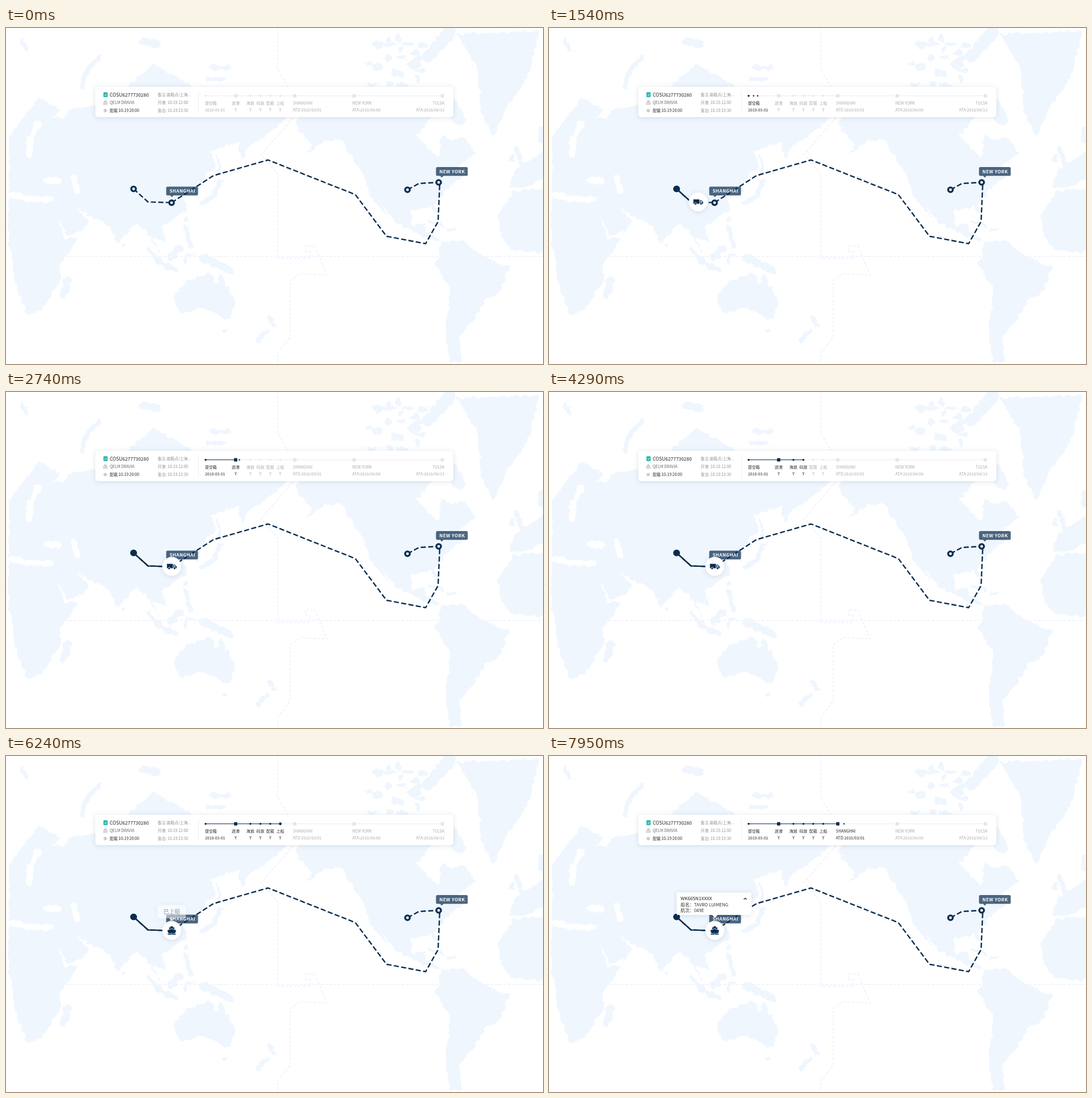
These frames come from a looping animation (947x592 px, 8 s). An HTML page:

```html
<!DOCTYPE html>
<html>
<head>
<meta charset="utf-8">
<title>Shipment tracking</title>
<style>
  html, body { margin: 0; width: 100%; height: 100%; overflow: hidden; background: #fff; }
  svg { display: block; width: 100vw; height: 100vh; }
  text { font-family: "Noto Sans CJK SC", "Noto Sans CJK", "Noto Sans", sans-serif; font-size: 6.9px; fill: #8f8f8f; }
  #map { fill: #eff6fe; filter: url(#coast); }
  #map path { fill: none; stroke: #eff6fe; stroke-linecap: round; stroke-linejoin: round; }
  #map .sea { stroke: #fff; }
  .grid { fill: none; stroke: #ededfb; stroke-width: 1.4; stroke-dasharray: 4.5 3; }
  .card { fill: #fff; filter: drop-shadow(0 1px 4px rgba(30, 50, 80, .14)); }
  .strong { font-weight: 500; fill: #222; }
  .route { fill: none; stroke: #0a2d50; stroke-width: 2.4; stroke-linejoin: round; }
  .planned { stroke-dasharray: 9 4.1; }
  .navy { fill: #0a2d50; }
  .tag { fill: #0a2d50; opacity: .72; }
  .tag-text { font-size: 8px; font-weight: 700; fill: #fff; letter-spacing: .45px; }
  .stop text { fill: #aaa; }
  .stop.lit text { fill: #222; }
  .mark { fill: #e6e6e6; transform-box: fill-box; transform-origin: center; }
  .lit .mark { fill: #0a2d50; }
  .big .mark { transform: scale(1.35); }
  #note text { font-size: 9.8px; font-weight: 500; fill: #1c3049; text-anchor: middle; }
  #details text { font-size: 7.9px; fill: #333; }
  #details .strong { font-size: 8.2px; fill: #222; }
</style>
</head>
<body>
<svg viewBox="0 0 947 592" preserveAspectRatio="none">
  <defs>
    <filter id="coast" filterUnits="userSpaceOnUse" x="0" y="0" width="947" height="592" color-interpolation-filters="sRGB">
      <feTurbulence type="fractalNoise" baseFrequency=".1" numOctaves="3" seed="4"/>
      <feDisplacementMap in="SourceGraphic" scale="10" xChannelSelector="R" yChannelSelector="G"/>
    </filter>
  </defs>

  <g class="grid">
    <path d="M90 402.5H947"/>
    <path d="M479 0V72L497 103L507 157L450 223L479 257V406H536V393H528V384H545L566 435L518 433L501 446V545L479 573V592"/>
  </g>

  <!-- Rough outlines; the coast filter adds the small detail -->
  <g id="map">
    <polygon points="5,205 8,188 25,165 58,122 98,145 84,158 104,160 110,144 168,134 178,108 190,140 216,100 262,62 294,84 334,106 424,128 479,138 497,158 452,194 430,205 415,236 410,200 361,218 370,240 344,272 339,302 331,290 316,282 313,298 320,320 276,350 283,378 259,368 270,398 250,362 230,344 204,372 198,381 180,346 146,331 125,317 146,341 136,356 110,368 82,320 5,300"/>
    <polygon points="5,285 80,310 104,371 127,370 94,420 97,445 65,494 38,508 18,455 10,392 5,390"/>
    <polygon points="294,474 320,446 360,430 370,451 380,432 404,485 392,516 350,492 306,503"/>
    <polygon points="511,166 530,142 547,122 610,130 715,140 738,135 757,150 724,190 750,218 763,228 768,188 793,198 806,190 830,222 798,242 810,256 773,290 757,312 761,330 748,315 714,322 718,350 740,342 738,358 752,362 768,378 735,367 690,345 662,310 676,336 640,292 632,260 605,220 590,196 560,200 525,225 540,206 515,180"/>
    <polygon points="768,378 803,372 842,403 888,422 868,469 848,476 822,518 800,545 805,590 782,588 775,525 785,460 757,418"/>
    <polygon points="796,10 940,6 920,88 878,148 860,190 838,150 832,72"/>
    <polygon points="955,284 897,287 866,330 876,373 890,390 955,397"/>
    <polygon points="888,283 890,266 900,247 935,225 955,212 955,262 914,282"/>
    <path stroke-width="5" d="M374 226L377 258M316 415L318 400L328 399M746 343L770 349M778 354H789M317 334V340M207 382V385"/>
    <path stroke-width="8" d="M345 309L366 296L378 270M317 352L326 384M252 390L272 414L300 426M465 511L472 523M460 534L444 550M134 106Q134 76 164 53M28 22L36 38M362 70H392M356 90H382M909 238L900 212M385 533H386M892 226V232"/>
    <path stroke-width="13" d="M290 404L305 388M348 405L370 414L394 428M109 443L101 470M242 24L266 28M945 200V178"/>
    <path stroke-width="22" d="M752 116L780 130L798 160M656 122H690M745 50L782 8"/>
    <path class="sea" stroke-width="11" d="M70 268H92M120 264L126 288M10 294L45 302H78M40 222L44 194L56 168"/>
  </g>

  <path class="route planned" d="M225 283.5L250.5 306.5L292 307.7"/>
  <path class="route planned" d="M292 307.7L366 260L462 232.5L616 293.5L671 367L740 380L762 341L765 272"/>
  <path class="route planned" d="M708 285L728 274L763 272"/>
  <path class="route" id="trail" d="M225 283.5L250.5 306.5L292 307.7"/>
  <g fill="#fff" stroke="#0a2d50" stroke-width="3.4">
    <circle cx="225" cy="283.5" r="4.1"/>
    <circle cx="292" cy="307.8" r="4.1"/>
    <circle cx="763" cy="272" r="4.1"/>
    <circle cx="708" cy="285" r="4.1"/>
  </g>
  <circle class="navy" id="origin" cx="225" cy="283.5" r="5.8"/>

  <g id="tags"></g>

  <g id="vehicle">
    <circle class="card" r="16.7"/>
    <g class="navy" id="truck">
      <path d="M-8.5-4.5H2V3.2H-8.5ZM2.8-3H6L8.6.2V3.2H2.8Z"/>
      <path fill="#fff" d="M4-2H5.6L7.2.2H4Z"/>
      <g stroke="#fff" stroke-width=".8"><circle cx="-4.6" cy="3.4" r="2"/><circle cx="5" cy="3.4" r="2"/></g>
    </g>
    <g class="navy" id="ship">
      <path d="M-2-7.2H2V-5.2H4.6V-2L7.8-.8L6.4 4.2Q3.2 6.6 0 4.8Q-3.2 6.6-6.4 4.2L-7.8-.8L-4.6-2V-5.2H-2Z"/>
      <path stroke="#fff" stroke-width=".8" fill="none" d="M-8-.4L0-3.2L8-.4"/>
      <path stroke="#0a2d50" stroke-width="1.4" fill="none" d="M-7.2 6Q-3.6 7.8 0 6Q3.6 7.8 7.2 6"/>
    </g>
  </g>

  <g id="note">
    <path class="card" d="M-22.5-44.5H22a3 3 0 0 1 3 3V-24.5a3 3 0 0 1-3 3H4.5L0-16L-4.5-21.5H-22.5a3 3 0 0 1-3-3V-41.5a3 3 0 0 1 3-3Z"/>
    <text y="-29.4"></text>
  </g>

  <g id="details">
    <path class="card" d="M227 240.5H355a2 2 0 0 1 2 2V278a2 2 0 0 1-2 2H297L292.5 285.5L288 280H227a2 2 0 0 1-2-2V242.5a2 2 0 0 1 2-2Z"/>
    <text class="strong" x="232" y="254">WK665N1XXXX</text>
    <text x="232" y="265.2">船名：TAVRO LUIMENG</text>
    <text x="232" y="275.2">航次：049E</text>
    <path d="M343.5 252.8L346 250.3L348.5 252.8" fill="none" stroke="#222" stroke-width="1.3"/>
  </g>

  <rect class="card" x="157.5" y="103.5" width="631.5" height="53.5" rx="5"/>
  <path d="M339.5 111V151" stroke="#f0f0f0"/>
  <rect x="171.8" y="113.2" width="7.4" height="8.6" rx="1.3" fill="#27b5ae"/>
  <path d="M173.6 117.6L175.2 119.1L177.6 116.3" fill="none" stroke="#fff"/>
  <path fill="#ccc" d="M173.3 127.6H177.2V129.6L179.2 131V135H171.2V131L173.3 129.6Z"/>
  <path stroke="#fff" stroke-width=".7" d="M171 132.4H179.4"/>
  <circle cx="175" cy="145.5" r="2.9" fill="#ccc"/>
  <text class="strong" x="183" y="120.9" style="font-size:8.4px">COSU6277730280</text>
  <text x="183" y="134.2" style="fill:#666">QELM DRAVIA</text>
  <text class="strong" x="183" y="148">配载 10-19 20:00</text>
  <text x="267.5" y="120.4">备注:装箱点/上海...</text>
  <text x="267.5" y="134">开港: 10-15 12:00</text>
  <text x="267.5" y="148">靠泊: 10-19 23:30</text>

  <path d="M352 119.5H770" stroke="#ececec"/>
  <path id="progress" stroke="#0a2d50"/>
  <g id="stops"></g>
  <g class="navy" id="dots"></g>
</svg>

<script>
const $ = id => document.getElementById(id);
const add = (parent, tag, attrs, text = '') => {
  const el = document.createElementNS('http://www.w3.org/2000/svg', tag);
  for (const key in attrs) el.setAttribute(key, attrs[key]);
  el.textContent = text;
  return parent.appendChild(el);
};
const show = (el, on) => { el.style.opacity = +on; };

// Arctic archipelago: seeded scatter of small islands
let seed = 11;
const random = () => (seed = seed * 16807 % 2147483647) / 2147483647;
for (let i = 0; i < 26; i++) {
  add($('map'), 'ellipse', {
    cx: 642 + 92 * random(), cy: 105 - 95 * random(),
    rx: 4 + 8 * random(), ry: 3 + 5 * random()
  });
}

function addTag(label, x, y, tipX) {
  add($('tags'), 'path', {
    class: 'tag',
    d: `M${x + 2.5} ${y}h51a2.5 2.5 0 0 1 2.5 2.5v10.5a2.5 2.5 0 0 1-2.5 2.5H${tipX + 3}l-3 3l-3-3H${x + 2.5}a2.5 2.5 0 0 1-2.5-2.5v-10.5a2.5 2.5 0 0 1 2.5-2.5Z`
  });
  add($('tags'), 'text', { class: 'tag-text', x: x + 5.9, y: y + 10.8 }, label);
}
addTag('SHANGHAI', 282.5, 279.5, 292.5);
addTag('NEW YORK', 758.3, 244.9, 768.5);

// Each stop is reached at time `at`; `count` dots run ahead of it, one per `tick`
const stops = [
  { x: 352, label: '提空箱', sub: '2010-03-01', note: '已提箱', at: 200, tick: 0, count: 0 },
  { x: 405, label: '进港', note: '已进港', square: true, at: 2040, tick: 76.25, count: 6, gap: 7.2, laps: 2 },
  { x: 431, label: '海放', at: 3490, tick: 150, count: 3 },
  { x: 448.7, label: '码放', at: 4440, tick: 150, count: 2 },
  { x: 466, label: '配载', note: '已配载', at: 5140, tick: 100, count: 2 },
  { x: 483.7, label: '上船', note: '已上船', at: 6240, tick: 100, count: 2 },
  { x: 509.3, label: 'SHANGHAI', sub: 'ATD:2010/03/01', note: '已开船', square: true, at: 7250, tick: 78, count: 2 },
  { x: 614, label: 'NEW YORK', sub: 'ATA:2010/04/06', square: true, at: 8950, tick: 100, count: 8, gap: 11 },
  { x: 769.5, label: 'TULSA', sub: 'ATA:2010/04/13', square: true, at: Infinity, tick: 0, count: 0 }
];
stops.forEach((s, i) => {
  const { gap = 6.6, laps = 1 } = s;
  s.cycle = s.count + 1;
  s.start = s.at - (s.cycle * laps + 2) * s.tick;
  s.lit = s.at - s.tick;
  s.el = add($('stops'), 'g', {});
  if (s.square) add(s.el, 'rect', { class: 'mark', x: s.x - 2.9, y: 116.6, width: 5.8, height: 5.8, rx: .6 });
  else add(s.el, 'circle', { class: 'mark', cx: s.x, cy: 119.5, r: 1.8 });

  const last = i === stops.length - 1;
  const pos = !s.sub ? { x: s.x, 'text-anchor': 'middle' }
    : last ? { x: s.x + 3.5, 'text-anchor': 'end' }
    : { x: s.x - (s.square ? 3.2 : 1) };
  add(s.el, 'text', { ...pos, y: 135.1 }, s.label);
  add(s.el, 'text', { ...pos, y: 146.6 }, s.sub || 'Y');

  // A long first leg leaves a little room after the starting mark
  const from = i ? stops[i - 1].x + (laps > 1 ? 1.6 : 0) : 0;
  s.dots = Array.from({ length: s.count }, (_, k) =>
    add($('dots'), 'circle', { cx: from + gap * (k + 1), cy: 119.5, r: 1.3 }));
});

const trail = $('trail');
const tripLength = trail.getTotalLength();
const boarding = stops.find(s => s.label === '上船');
const within = (t, from, to) => t >= from && t < to;

function render(t) {
  const travelled = Math.min(Math.max(Math.floor((t - 900) / 80), 0) / 13, 1) * tripLength;
  const at = trail.getPointAtLength(travelled);
  const place = `translate(${at.x + .3} ${at.y - .4})`;
  trail.style.strokeDasharray = `${travelled} 999`;
  show(trail, travelled > 0);
  show($('origin'), t >= 200);
  $('vehicle').setAttribute('transform', place);
  show($('vehicle'), t >= 200);
  show($('truck'), t < boarding.at);
  show($('ship'), t >= boarding.at);

  let reached = stops[0].x;
  for (const s of stops) {
    const lit = t >= s.lit;
    const big = s.tick && within(t, s.at, s.at + 200);
    if (lit) reached = s.x;
    s.el.setAttribute('class', `stop${lit ? ' lit' : ''}${big ? ' big' : ''}`);

    const lead = Math.floor((t - s.start) / s.tick) % s.cycle;
    const running = within(t, s.start + s.tick, s.lit);
    s.dots.forEach((dot, k) => show(dot, running && (lead || s.cycle) - k <= 2 && (lead || s.cycle) > k));
  }
  $('progress').setAttribute('d', `M352 119.5H${reached}`);

  const stop = stops.find(s => s.note && within(t, s.at, s.at + 700));
  show($('note'), stop ? (t < stop.at + 200 ? .5 : 1) : 0);
  if (stop) {
    $('note').setAttribute('transform', place);
    $('note').querySelector('text').textContent = stop.note;
  }
  show($('details'), t >= 7950);
}

function tick() {
  render(performance.now() % 8000);
  requestAnimationFrame(tick);
}
tick();
</script>
</body>
</html>
```
